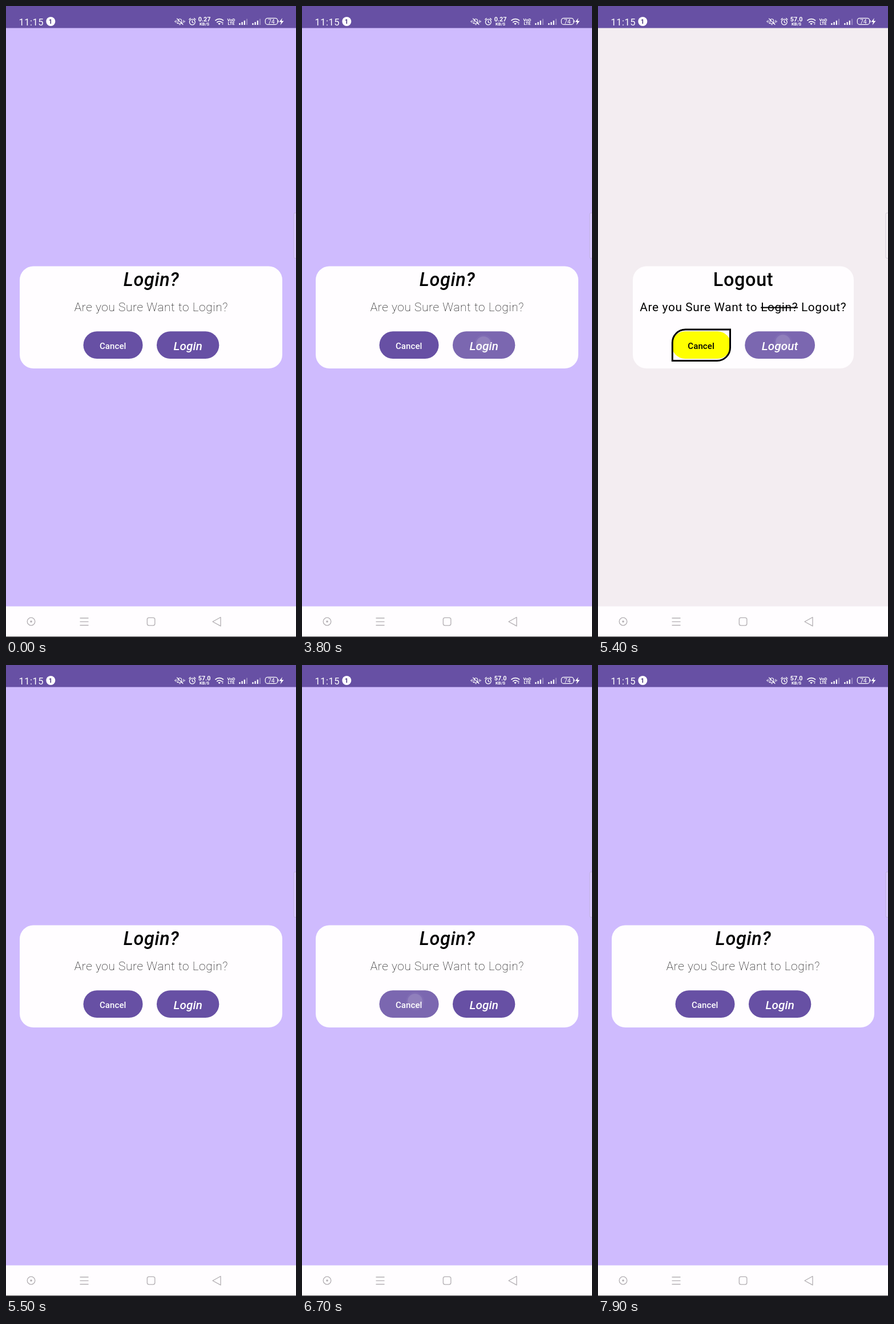
An HTML page that plays this animation: 508 px wide and 1102 px high, repeating every 8000 ms.

```html
<!DOCTYPE html>
<html lang="en">
<head>
<meta charset="utf-8">
<title>Login and logout dialogs</title>
<style>
  html, body { margin: 0; width: 100%; height: 100%; overflow: hidden; }
  svg { display: block; font-family: Roboto, sans-serif; }
  .mid { text-anchor: middle; }
  .title { font-size: 32.4px; font-weight: 500; letter-spacing: .65px; }
  .body { font-size: 20.8px; letter-spacing: .65px; }
  .thin { font-weight: 100; }
  .small { font-size: 15px; font-weight: 500; letter-spacing: .1px; }
  .big { font-size: 20.7px; font-weight: 500; font-style: italic; letter-spacing: .1px; }
  .slant { font-style: italic; }
  .strike { text-decoration: line-through; }
  .white { fill: #fff; }
  .card { fill: #fffdff; }
  .btn { fill: #6750a4; }
  .line { fill: none; stroke: #fff; stroke-width: 1.3; stroke-linecap: round; stroke-linejoin: round; }
  .nav { fill: none; stroke: #b2aeb2; stroke-width: 1.3; stroke-linejoin: round; }
  .press { opacity: 0; }
</style>
</head>
<body>
<svg width="508" height="1102" viewBox="0 0 508 1102">
  <defs>
    <g id="bars" fill="#fff">
      <path d="M0 10h2.2v-3h-2.2zM4.2 10h2.2v-5h-2.2zM8.4 10h2.2v-7.500h-2.2z"/>
      <path d="M12.600 10h2.200v-10.500h-2.200z" opacity=".3"/>
    </g>
    <g id="dot">
      <circle r="16" fill="#fff" opacity=".12"/>
      <circle r="13.300" fill="#fff" fill-opacity=".58" stroke="#7a5cc4" stroke-opacity=".27" stroke-width="1.600"/>
    </g>
  </defs>

  <g id="login">
    <rect width="508" height="1102" fill="#cfbbfe"/>
    <rect class="card" x="24" y="454.500" width="460" height="178.500" rx="24"/>
    <text class="mid title slant" x="254.500" y="489">Login?</text>
    <text class="mid body thin" x="254.300" y="533">Are you Sure Want to Login?</text>
    <rect class="btn" x="135.500" y="568.300" width="104" height="47.700" rx="23.850"/>
    <rect class="press" id="cancelIn" x="135.500" y="568.300" width="104" height="47.700" rx="23.850" fill="#fff"/>
    <text class="mid small white" x="187.200" y="598.500">Cancel</text>
    <rect class="btn" x="264" y="568.300" width="109.300" height="47.700" rx="23.850"/>
    <rect class="press" id="okIn" x="264" y="568.300" width="109.300" height="47.700" rx="23.850" fill="#fff"/>
    <text class="mid big white" x="318.700" y="600.500">Login</text>
  </g>

  <g id="logout">
    <rect width="508" height="1102" fill="#f3edf1"/>
    <rect class="card" x="61" y="454.500" width="387" height="178.500" rx="24"/>
    <text class="mid title" x="254.500" y="489">Logout</text>
    <text class="mid body" x="254.300" y="533">Are you Sure Want to <tspan class="strike">Login?</tspan> Logout?</text>
    <rect x="129" y="568.300" width="104" height="47.700" rx="23.850" fill="#ff0"/>
    <rect class="press" id="cancelOut" x="129" y="568.300" width="104" height="47.700" rx="23.850"/>
    <path d="M130.300 619.500V588a23 23 0 0 1 23-23H231.500V596.500a23 23 0 0 1-23 23Z" fill="none" stroke="#000" stroke-width="3"/>
    <text class="mid small" x="180.600" y="598.500">Cancel</text>
    <rect class="btn" x="257.300" y="568.300" width="122.700" height="47.700" rx="23.850"/>
    <rect class="press" id="okOut" x="257.300" y="568.300" width="122.700" height="47.700" rx="23.850" fill="#fff"/>
    <text class="mid big white" x="318.600" y="600.500">Logout</text>
  </g>

  <rect x="504" y="361.500" width="8" height="79" rx="2" fill="#fff" fill-opacity=".2" stroke="#a99fb5" stroke-opacity=".4"/>

  <!-- status bar -->
  <rect width="508" height="38.500" fill="#6750a4"/>
  <text class="white" x="22.500" y="33.500" font-size="16.500" letter-spacing=".5">11:15</text>
  <circle cx="78.300" cy="27" r="8" fill="#fff"/>
  <text class="mid" x="78" y="31" font-size="11" font-weight="700" fill="#4b3a82">1</text>
  <g class="line">
    <path d="M300 30.500h9l-1.300-2v-2.500a3.200 3.200 0 0 0-6.400 0v2.500zM303.500 32.500h2M299.500 22l10.500 10.500M298 25v4M296 26.300v1.400M311 25v4M313 26.300v1.400" stroke-width="1.100"/>
    <circle cx="326.300" cy="28" r="4.900"/>
    <path d="M326.300 25.500v2.700l1.800 1.200M320.800 23.500l2.300-2M331.800 23.500l-2.300-2"/>
    <path d="M367 25.200a10 10 0 0 1 13.500 0M369.700 28.300a6 6 0 0 1 8 0" stroke-width="1.700"/>
    <rect x="454.300" y="21.300" width="21.400" height="11" rx="3.800" stroke-width="1.200"/>
  </g>
  <g class="white">
    <path d="M371.300 30.500q2.300-1.500 4.600 0l-2.300 2.500zM378 29.500l1.400-2 1.400 2zM378 30.700l1.400 2 1.400-2zM484 21l-5.500 7h3.500l-1.500 5.500 6-7.500h-3.800z"/>
    <g class="mid" font-weight="700">
      <text id="rate" x="347.600" y="27" font-size="10.800">0.27</text>
      <text x="347.600" y="34.300" font-size="7.500">KB/S</text>
      <text x="394.500" y="26.500" font-size="7.500">VoD</text>
      <text x="394.500" y="33.200" font-size="7.500">LTE</text>
    </g>
    <text class="mid" x="464.800" y="30.700" font-size="10.500">74</text>
    <path d="M476.500 25h1.200v3.600h-1.200z"/>
  </g>
  <use href="#bars" x="408.300" y="23"/>
  <use href="#bars" x="431.300" y="23"/>

  <!-- navigation bar -->
  <rect y="1048.500" width="508" height="53.500" fill="#fffdff"/>
  <rect y="1101" width="508" height="1" fill="#5b585b"/>
  <g class="nav">
    <circle cx="44" cy="1075" r="6.800"/>
    <circle cx="44" cy="1075" r="1.800" fill="#b2aeb2" stroke="none"/>
    <path d="M129.500 1069h15M129.500 1075.300h15M129.500 1081.500h15"/>
    <rect x="247.300" y="1068.300" width="13.500" height="13.500" rx="3"/>
    <path d="M362 1075.200l14-7.700v15.400z"/>
  </g>

  <use id="touchA" href="#dot"/>
  <use id="touchB" href="#dot"/>
</svg>

<script>
const LOOP = 8000, STEP = 100;
const FADE = [1, .6, .25];      // touch dot after contact
const RIPPLE = [.06, .13, .13]; // button tint while pressed
const $ = id => document.getElementById(id);

// start, x, y, pressed button (if any)
const taps = [
  [3600, 318, 590, 'okIn'],
  [5200, 324, 587, 'okOut'],
  [6000, 252, 584, null],
  [6500, 198, 587, 'cancelIn'],
  [7600, 189, 589, 'cancelOut']
];
const buttons = ['okIn', 'okOut', 'cancelIn', 'cancelOut'];
const switches = [3900, 5500, 6800, 7900];

function place(id, x, y, alpha) {
  $(id).setAttribute('transform', `translate(${x} ${y})`);
  $(id).style.opacity = alpha;
}

function draw(t) {
  const out = switches.filter(s => t >= s).length % 2 === 1;
  $('login').style.display = out ? 'none' : '';
  $('logout').style.display = out ? '' : 'none';
  $('rate').textContent = t < 4200 ? '0.27' : '57.0';

  buttons.forEach(b => $(b).style.opacity = 0);
  place('touchA', 0, 0, 0);
  place('touchB', 0, 0, 0);

  // two-finger touch, closing slightly
  if (t >= 2700 && t < 3400) {
    const k = Math.min(1, (t - 2700) / 500) * 12;
    const alpha = t < 3200 ? 1 : FADE[(t - 3100) / STEP];
    place('touchA', 402.5 - k, 401 + k, alpha);
    place('touchB', 321 + k, 489 - k, alpha);
  }

  for (const [start, x, y, button] of taps) {
    const i = (t - start) / STEP;
    if (i < 0 || i >= FADE.length) continue;
    place('touchA', x, y, FADE[i]);
    if (button) $(button).style.opacity = RIPPLE[i];
  }
}

const begin = performance.now();
function tick() {
  const t = (performance.now() - begin) % LOOP;
  draw(Math.floor(t / STEP) * STEP);
  requestAnimationFrame(tick);
}
tick();
</script>
</body>
</html>
```
